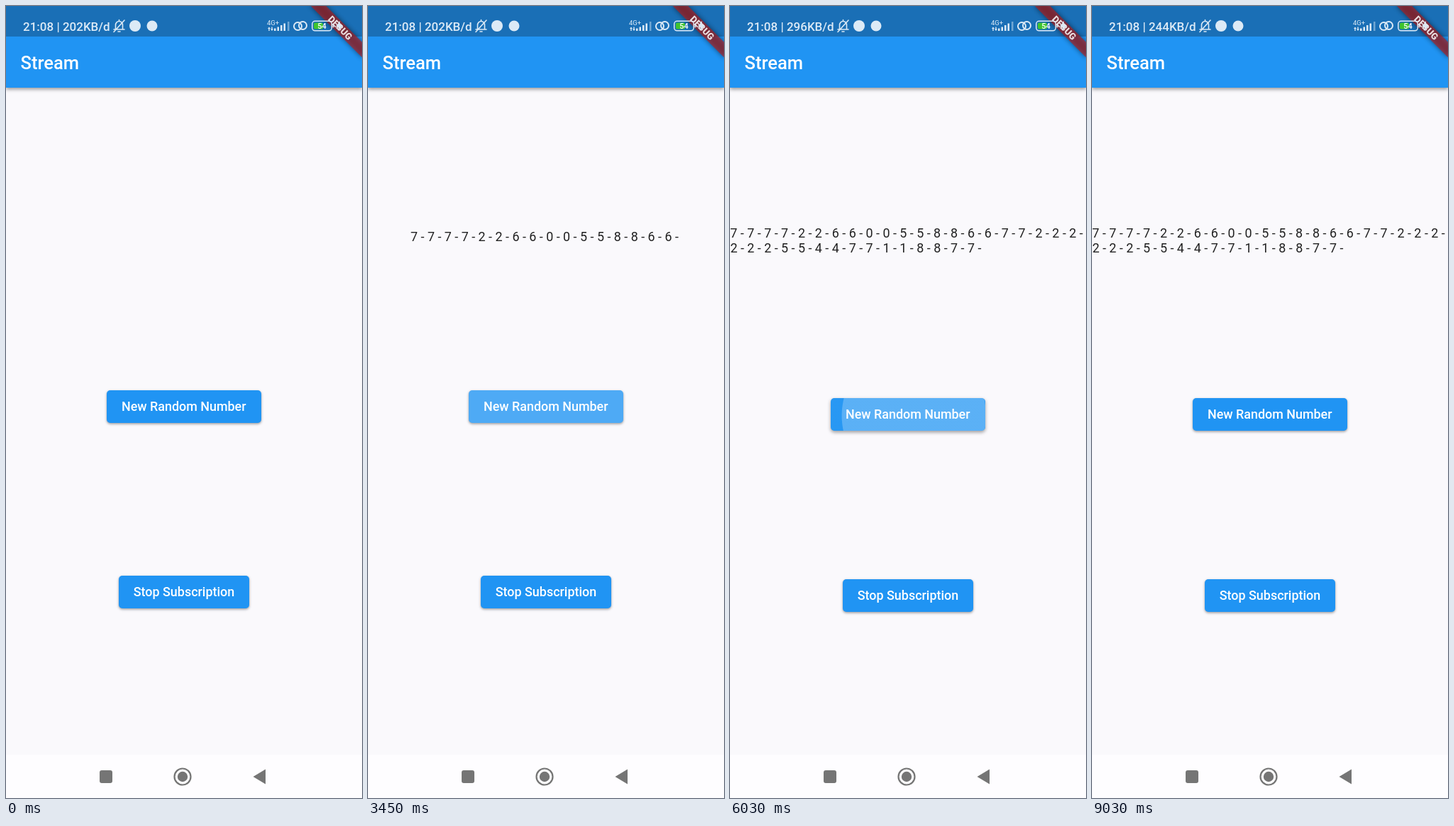
These frames come from a looping animation (502x1115 px, 9.39 s). An HTML page:

```html
<!DOCTYPE html>
<html lang="en">
<head>
<meta charset="utf-8">
<title>Stream</title>
<style>
html, body { margin: 0; width: 100%; height: 100%; overflow: hidden; background: #faf9fc; }
body { position: relative; font-family: Roboto, sans-serif; }
.bar { position: absolute; left: 0; top: 0; width: 502px; height: 114.5px; background: #2094f3;
  box-shadow: 0 2.5px 5px rgba(0,0,0,.38); }
svg { position: absolute; left: 0; top: 0; }
.button { position: absolute; height: 46px; border-radius: 5px; background-color: #2094f3; color: #fff;
  font: 500 17.92px/46px Roboto, sans-serif; text-align: center; white-space: nowrap; }
#next { left: 142px; width: 217.5px; }
#stop { left: 159px; width: 184px; }
</style>
</head>
<body>
<div class="bar"></div>
<div class="button" id="next">New Random Number</div>
<div class="button" id="stop">Stop Subscription</div>
<svg width="502" height="1115" viewBox="0 0 502 1115">
  <defs><filter id="blur" x="-20%" y="-80%" width="140%" height="260%"><feGaussianBlur stdDeviation="3.5"/></filter></defs>
  <rect width="502" height="43" fill="#1a6fb6"/>
  <text x="20.5" y="88.8" font-size="25.6" font-weight="500" fill="#fff">Stream</text>

  <g transform="translate(502 0) rotate(45)">
    <rect x="-51" y="35.8" width="102" height="15.3" fill="#000" opacity=".5" filter="url(#blur)"/>
    <rect x="-51" y="35.8" width="102" height="15.3" fill="#b71c1c" opacity=".63"/>
    <text y="48" font-size="13" font-weight="900" fill="#fff" fill-opacity=".85" text-anchor="middle">DEBUG</text>
  </g>

  <g fill="#dceaf6">
    <text id="speed" x="24" y="35" font-size="17" font-weight="500"></text>
    <g fill="none" stroke="#dceaf6" stroke-width="1.6" stroke-linecap="round">
      <path d="M152 33h15M154.500 33v-6a5 5.500 0 0 1 10 0v6M159.500 21v-1.500M158 36h3M152 36.500L167 20"/>
      <rect x="406" y="23" width="11" height="11" rx="5.500" stroke-width="2"/>
      <rect x="413" y="22" width="11" height="11" rx="5.500" stroke-width="2"/>
    </g>
    <circle cx="182" cy="28" r="8"/>
    <circle cx="206" cy="28" r="7.500"/>
    <text x="368" y="26.500" font-size="9.500">4G+</text>
    <path d="M369 32l2-2.500 2 2.500h-1.300v3h-1.400v-3zM373 32.500h1.300v-3h1.400v3h1.300l-2 2.500z"/>
    <path d="M378 31.500h2.500v3.500h-2.500zM382.500 29.500h2.500v5.500h-2.500zM387 27h2.500v8h-2.500zM391.500 24.500h2.500v10.500h-2.500z"/>
    <path d="M397 22h2.500v13h-2.500z" opacity=".45"/>
    <rect x="431.800" y="21.300" width="27.500" height="13.500" rx="4" fill="none" stroke="#dceaf6" stroke-width="1.500"/>
    <rect x="460.500" y="25.500" width="1.800" height="5" rx=".9"/>
    <rect x="434" y="23.500" width="13" height="9" rx="2" fill="#3fc42e"/>
    <text x="445.500" y="32" font-size="11" font-weight="500" fill="#fff" text-anchor="middle">54</text>
    <path d="M471 21l-6 8h4l-1 6 7-8h-4z"/>
  </g>

  <g font-size="17.92" fill="#000" fill-opacity=".87">
    <text id="line1" style="white-space:pre"></text>
    <text id="line2" style="white-space:pre" x=".4" y="347"></text>
  </g>

  <rect y="1054" width="502" height="61" fill="#fefdff"/>
  <g fill="#757575">
    <rect x="132" y="1076" width="18" height="18" rx="3"/>
    <circle cx="249" cy="1085" r="11.500" fill="none" stroke="#757575" stroke-width="2.200"/>
    <circle cx="249" cy="1085" r="7.200"/>
    <path d="M348.500 1085L366 1074.500v21z"/>
  </g>
</svg>
<script>
const LOOP = 9390, STEP = 30, HOLD = 120, PITCH = 23.87, PER_LINE = 21;
const NUMBERS = '772605867222547187';
// Release times: the first taps each emit a number to two listeners.
const TAPS = [150, 570, 990, 1410, 1820, 2270, 2740, 3205, 3610, 3980, 4310, 4610,
  4905, 5100, 5290, 5470, 5650, 5939];
const DIGITS = [0, ...NUMBERS].slice(1).flatMap(n => [n, n]);
const NEXT_TAPS = [...TAPS, 7540, 8010, 8415], STOP_TAPS = [6820];

const $ = id => document.getElementById(id);
const clamp = v => Math.max(0, Math.min(1, v));

// cubic-bezier(.25, .1, .25, 1)
function ease(x) {
  let lo = 0, hi = 1, u;
  for (let i = 0; i < 20; i++) {
    u = (lo + hi) / 2;
    if (.75 * u * (1 - u) ** 2 + .75 * u * u * (1 - u) + u ** 3 < x) lo = u; else hi = u;
  }
  return .3 * u * (1 - u) ** 2 + 3 * u * u * (1 - u) + u ** 3;
}

function drawButton(el, t, taps, width, touchX, touchY, top) {
  const layers = [], reach = Math.hypot(width, 46) / 2;
  let glow = 0;
  for (const release of taps) {
    const age = t - release + HOLD, after = age - HOLD;
    if (age < 0 || after > 400) continue;
    const grow = ease(clamp(after < 0 ? age / 1000 : HOLD / 1000 + after / 225));
    const alpha = .24 * clamp(age / 75) * (1 - clamp((after - 225) / 150));
    const r = reach * .3 + (reach * .7 + 5) * grow;
    const x = touchX + (width / 2 - touchX) * grow, y = touchY + (23 - touchY) * grow;
    const white = `rgba(255,255,255,${alpha})`;
    layers.push(`radial-gradient(circle at ${x}px ${y}px, ${white} ${r - .5}px, rgba(255,255,255,0) ${r + .5}px)`);
    glow = Math.max(glow, clamp(Math.min(age, 2 * HOLD - age) / 200));
  }
  const tint = `rgba(255,255,255,${.24 * glow})`;
  layers.push(`linear-gradient(${tint}, ${tint})`);
  const lift = 2 + 6 * ease(glow);
  el.style.top = top + 'px';
  el.style.backgroundImage = layers.join(',');
  el.style.boxShadow = `0 ${lift * .7}px ${lift * 1.3 + 1}px rgba(0,0,0,.38)`;
}

function draw() {
  const t = Math.floor(performance.now() % LOOP / STEP) * STEP;
  const shown = DIGITS.slice(0, 2 * TAPS.filter(r => r <= t).length);
  const wrapped = shown.length > PER_LINE;
  const first = shown.slice(0, PER_LINE), join = list => list.map(n => n + ' - ').join('');

  $('line1').textContent = join(first);
  $('line1').setAttribute('x', 251 - first.length * PITCH / 2);
  $('line1').setAttribute('y', wrapped ? 326 : 331);
  $('line2').textContent = join(shown.slice(PER_LINE));
  $('speed').textContent = `21:08 | ${t < 3850 ? 202 : t < 7650 ? 296 : 244}KB/d`;

  drawButton($('next'), t, NEXT_TAPS, 217.5, 158, 33, wrapped ? 551.7 : 541.4);
  drawButton($('stop'), t, STOP_TAPS, 184, 105, 26, wrapped ? 807 : 801.8);
  requestAnimationFrame(draw);
}
draw();
</script>
</body>
</html>
```
